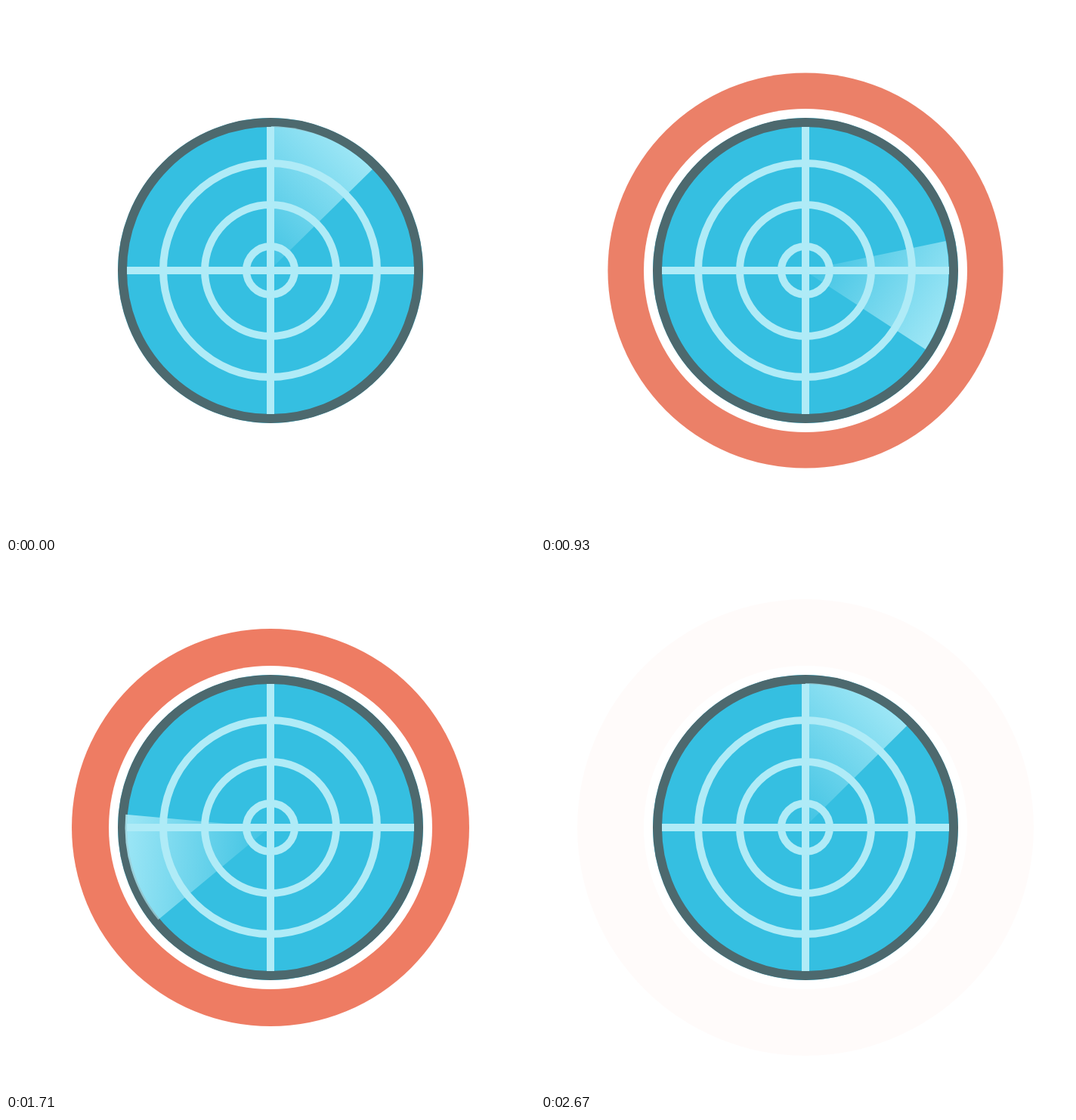
These frames come from a looping animation (700x700 px, 2700 ms). An HTML page with a canvas:

```html
<!DOCTYPE html>
<html lang="en">
<head>
<meta charset="utf-8">
<title>Radar</title>
<style>
  html, body { margin: 0; height: 100%; overflow: hidden; background: #fff; }
  canvas { display: block; }
</style>
</head>
<body>
<canvas id="stage" width="700" height="700"></canvas>
<script>
const ctx = document.getElementById("stage").getContext("2d");
const LOOP = 2700, STEP = 30, TAU = Math.PI * 2, DEGREE = TAU / 360;
const BLUE = "#35bfe1", GRID = "#afebf7";

const turn = bezier(.62, .2, .63, .98);
const shrink = bezier(.33, .2, .65, 1);
const grow = bezier(.33, 0, .65, 1);
const fadeIn = bezier(.3, .4, .48, 1);
const fadeOut = bezier(.65, 0, .85, .85);

// Same easing as CSS cubic-bezier()
function bezier(x1, y1, x2, y2) {
  const at = (a, b, u) => 3 * (1 - u) ** 2 * u * a + 3 * (1 - u) * u * u * b + u ** 3;
  return x => {
    let low = 0, high = 1;
    for (let i = 0; i < 24; i++) {
      const mid = (low + high) / 2;
      if (at(x1, x2, mid) < x) low = mid;
      else high = mid;
    }
    return at(y1, y2, low);
  };
}

const mix = (from, to, amount) => from + (to - from) * amount;

function disc(radius, color) {
  ctx.fillStyle = color;
  ctx.beginPath();
  ctx.arc(0, 0, radius, 0, TAU);
  ctx.fill();
}

function ring(radius, width, color, shift = 0) {
  ctx.strokeStyle = color;
  ctx.lineWidth = width;
  ctx.beginPath();
  ctx.arc(shift, shift, radius, 0, TAU);
  ctx.stroke();
}

// The pulse closes in while appearing, then spreads while vanishing
function pulse(progress) {
  const half = progress * 2 % 1;
  const closing = progress < .5;
  const radius = closing ? mix(294, 254.4, shrink(half)) : mix(254.4, 302, grow(half));
  const alpha = closing ? fadeIn(half) : 1 - fadeOut(half);
  disc(radius, `rgba(${mix(231, 240, progress)}, 117, 90, ${alpha})`);
  disc(214, "#fff");
}

function sweep(progress) {
  const radius = 191;
  const light = ctx.createLinearGradient(0, 0, 0, -radius);
  light.addColorStop(0, "rgba(175, 237, 249, .08)");
  light.addColorStop(1, "rgba(175, 237, 249, .85)");
  ctx.save();
  ctx.translate(-1.5, 0);
  ctx.rotate((45.5 + 360 * turn(progress)) * DEGREE);
  ctx.fillStyle = light;
  ctx.beginPath();
  ctx.moveTo(0, 0);
  ctx.arc(0, 0, radius, -134.8 * DEGREE, -90 * DEGREE);
  ctx.fill();
  ctx.restore();
}

function grid() {
  ctx.fillStyle = GRID;
  ctx.fillRect(-190, -5, 380, 10);
  ctx.fillRect(-5, -190, 10, 380);
  ring(32, 10, GRID);
  ring(87, 10, GRID);
  ring(141.5, 10, GRID, -.5);
}

function draw(progress) {
  ctx.setTransform(1, 0, 0, 1, 350, 350);
  ctx.clearRect(-350, -350, 700, 700);
  pulse(progress);
  disc(202, BLUE);
  ring(196, 12, "#4d696e");
  sweep(progress);
  grid();
}

function tick() {
  const time = performance.now() % LOOP;
  draw(Math.floor(time / STEP) * STEP / LOOP);
  requestAnimationFrame(tick);
}
tick();
</script>
</body>
</html>
```
